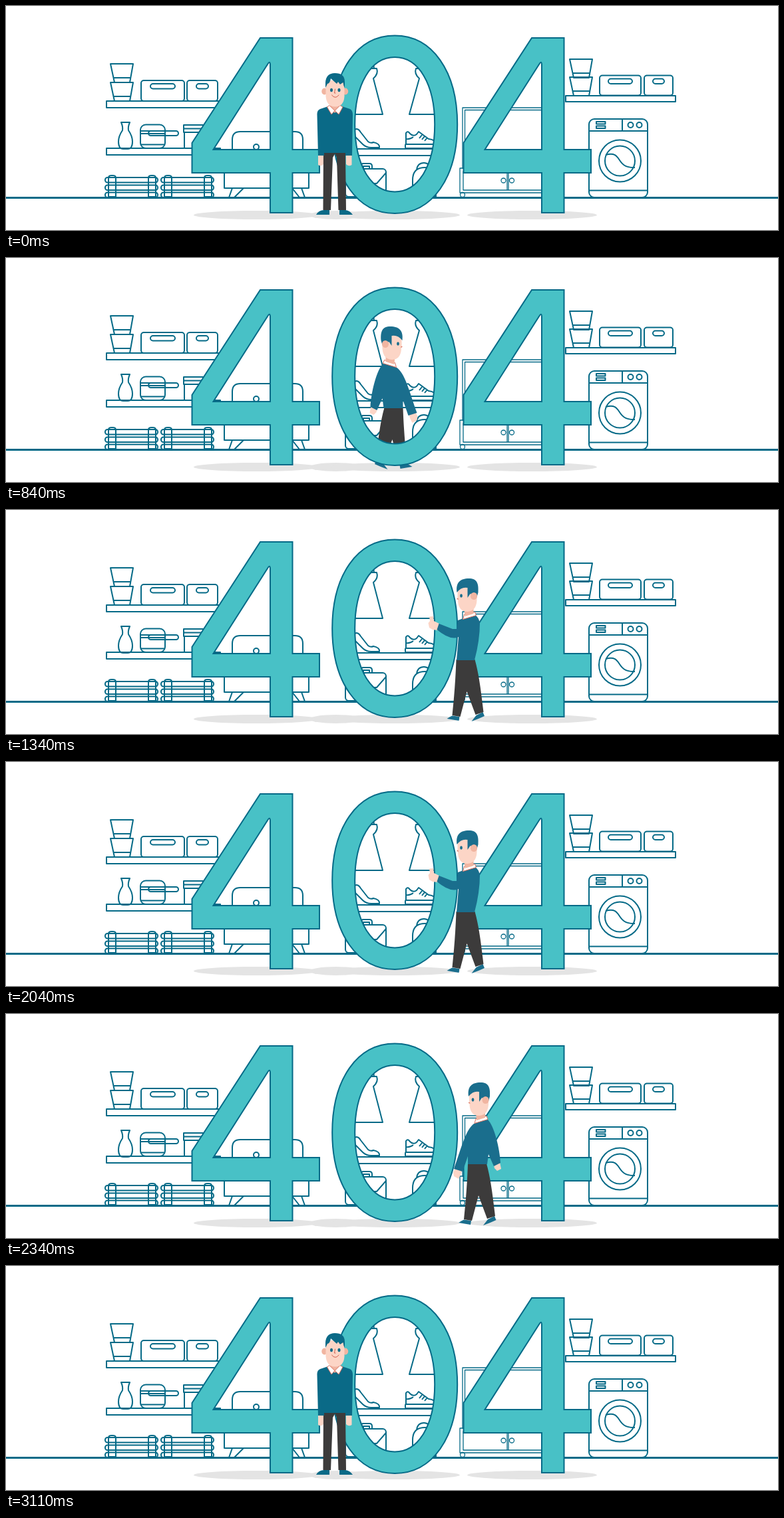
An HTML page that plays this animation: 1160x337 px, repeating every 4810 ms.

```html
<!DOCTYPE html>
<html lang="en">
<head>
<meta charset="utf-8">
<title>404</title>
<style>
  html, body { margin: 0; width: 100%; height: 100%; overflow: hidden; background: #fff; }
  svg { display: block; width: 1160px; height: 337px; }
  .line { fill: none; stroke: #056a87; stroke-width: 2; stroke-linejoin: round; }
  .line .bg { fill: #fff; }
  .thin { stroke-width: 1.3; }
  .digit { fill: #48c1c6; stroke: #056a87; stroke-width: 2; fill-rule: evenodd; }
  .shade { fill: #e4e4e4; }
  .hair, .shoe { fill: #0a6a87; }
  .front { fill: #0a6a87; }
  .knit { fill: #1a6e8d; }
  .skin { fill: #fcd5c6; }
  .blush { fill: #f1b5a1; }
  .pants { fill: #3c3b3b; }
  .collar { fill: #fff; stroke: #d9705f; stroke-width: 1; }
  .mouth { fill: none; stroke: #d0604f; stroke-width: 1; stroke-linecap: round; }
  .pose { display: none; }
</style>
</head>
<body>
<svg id="stage" viewBox="0 0 1160 337"></svg>
<script>
const path = (d, cls = '') => `<path class="${cls}" d="${d}"/>`;
const box = (x1, y1, x2, y2, r = 0, cls = '') =>
  `<rect class="${cls}" x="${x1}" y="${y1}" width="${x2 - x1}" height="${y2 - y1}" rx="${r}"/>`;
const oval = (cx, cy, rx, ry = rx, cls = '') =>
  `<ellipse class="${cls}" cx="${cx}" cy="${cy}" rx="${rx}" ry="${ry}"/>`;
const group = (inner, attrs = '') => `<g ${attrs}>${inner}</g>`;
const move = (x, inner, y = 0) => group(inner, `transform="translate(${x} ${y})"`);

// ---- Room ----
const pot = (x, y) => move(x, path('M0 0H34L29 28H6ZM5 21H30'), y);
const bin = (x, y, w, h, inset, slot) =>
  box(x, y, x + w, y + h, 4) + box(x + inset, y + 5, x + inset + slot, y + 12.5, 3.8);

const crate = x => move(x,
  [258, 269.5, 280.5].map(y => box(0, y, 79, y + 7.5, 3.5)).join('') +
  [5, 65].map(p => path(`M${p} 287V259Q${p} 255 ${p + 4} 255H${p + 7}Q${p + 11} 255 ${p + 11} 259V287Z`)).join(''));

const dress = x => move(x, path(
  'M616 94H653Q656 102 648 109L662 163H606L621 109Q613 102 616 94Z' +
  'M619.5 94L622 77H628V94M641 94V77H647L649 94'));

const leftSide =
  pot(157, 87) + pot(157, 115) +
  bin(203, 112, 65, 31, 14, 37) + bin(272, 112, 46, 31, 14, 18) +
  box(151, 143, 322, 153) + box(151, 214, 322, 224) +
  path('M173 175H186Q183 182 184 187C188 193 190 198 190 204Q190 215 183 215H176Q169 215 169 204C169 198 171 193 175 187Q176 182 173 175Z') +
  box(202, 178.5, 239, 214, 8) + path('M202 188H239M202 192H239M203 208.5H238') +
  box(214, 188, 259, 195, 3.5) +
  box(267, 179, 310, 190) + path('M267 184.5H310') + box(268, 190, 310, 214) +
  crate(149) + crate(233) +
  path('M340 216V201Q340 189 352 189H434Q446 189 446 201V216') + oval(376, 212, 4) +
  box(328, 230, 455, 274) +
  path('M340 274L335 288H343L357 274M430 274L441 288H449L444 274');

const middle =
  dress(0) + dress(-96) + box(497, 215, 665, 225) +
  path('M524 186Q529 183 533 190L544 204Q548 207 552 205Q562 207 561 213H549Q541 213 536 208L524 196') +
  path('M601 208V191Q604 187 607 192Q612 197 617 193L620 189L635 200Q645 201 647 208M612 197Q607 201 601 200M621 199L625 194M625 201L629 196M629 203L633 198') +
  box(600, 208, 648, 214, 1) +
  box(510, 245, 571, 287, 5) +
  path('M511 247L523 267H557L571 251M533 245V241Q533 237 537 237H546Q550 237 550 241V245M537 245V241H546V245') +
  box(536, 264, 545, 271) +
  path('M611 287V262Q611 243 629 243Q646 243 646 262V287ZM617 247Q618 236 628 236Q637 236 638 247M611 273H646') +
  box(624, 279, 642, 284);

const cabinet =
  box(686, 153, 820, 244) + box(689.5, 156.5, 816, 244) +
  box(682, 244, 826, 281) + box(687, 249, 822, 277) +
  path('M753 249V277M755 249V277') +
  oval(747.5, 262.5, 3.5) + oval(760, 262.5, 3.5) + oval(686, 284, 3.5);

const rightSide =
  pot(847, 80) + pot(847, 107) + box(841, 135, 1006, 144) +
  bin(892, 104.5, 62, 30, 13, 36) + bin(959, 104.5, 43, 30, 13, 17) +
  box(876, 170, 964, 288, 8, 'bg') + path('M876 188H964M926 170V188M876 277.5H964') +
  box(887, 174, 900.5, 177.5) + box(887, 180.5, 900.5, 184) +
  oval(938.5, 179, 4) + oval(951.5, 179, 4) +
  oval(922.5, 233, 31.5) + oval(922.5, 233, 22.5) +
  path('M901 224C928 217 914 244 945 243');

// ---- Digits ----
const four = x => move(x, path(
  'M382 48H430.5V216H471V251H430.5V311H397V251H279.5V206Z' +
  'M397 216V88Q396.5 82 393.5 87L311.5 216Z', 'digit'));

const ring = (a, b, k = 0.6) => {
  const p = a * k, q = b * k;
  return `M0 ${-b}C${p} ${-b} ${a} ${-q} ${a} 0S${p} ${b} 0 ${b}S${-a} ${q} ${-a} 0S${-p} ${-b} 0 ${-b}Z`;
};
const zero = path(ring(94, 133.7) + ring(60, 101.2), 'digit');

// ---- Man ----
const standing =
  path('M469 224H477V238Q473 242 469 239ZM511 224H519.5V239Q515 242 511 238Z', 'skin') +
  path('M477 219H510L511 307H499.5L497 228L494.5 222L491 228L488 307H476.5Z', 'pants') +
  path('M466 314Q470 307 478 307H486V314ZM501 314V307H510Q517 308 521 314Z', 'shoe') +
  path('M484 151H505L517 155Q521 157 521 164L520 225H510V221H478V225H469L467.5 164Q467 157 472 155Z', 'front') +
  path('M487 146H502V153L494 161L487 153Z', 'blush') +
  path('M486 149.5L494 157.5L489 163L482.5 152ZM502 149.5L494 157.5L500 163L506 152Z', 'collar') +
  oval(478.5, 128.5, 4.2, 5, 'blush') + oval(510, 128.5, 4.2, 5, 'blush') +
  path('M480.5 112V136Q482 151.5 494.5 151.5Q507.500 151.5 508.500 136V112Z', 'skin') +
  path('M480 123V115Q481 101 494 101Q509 101 509 114V123Q507 120 506.500 115L502 118L499 114L497 117L488 109Q487 116 483 117Z', 'hair') +
  oval(489, 126.5, 2, 2.8, 'hair') + oval(500.5, 126.5, 2, 2.8, 'hair') +
  path('M494.500 125L493.500 131H495M489.500 134Q495 141 500 134', 'mouth');

const head =
  path('M-5 146H9V156L-4 160Z', 'blush') +
  path('M-15 116V131L-16 134L-14.500 135.500Q-14 153 0 153Q13 152 14 136V114Z', 'skin') +
  path('M-16 124C-18 109 -11 103 2 103C14 103 17 110 16 124L14 131L4 126L0 132V117Q-9 115 -16 124Z', 'knit') +
  oval(9.5, 129.5, 5, 5.5, 'blush') + oval(-9.5, 129, 1.9, 2.7, 'knit') +
  path('M-15.500 133.500L-14 134', 'mouth');

const collar = path('M-7 164.500L-5 157.500L11 153.500L13 158.500Z', 'collar');

const swing =
  path('M-36 233L-26 236L-28 242L-31 248L-38 244L-39 238ZM22 227L31 223L33 233L27 236L23 232Z', 'skin') +
  path('M-6 164C-20 171 -27 203 -38 233L-25 237L-17 214V226H12L14 211L22 229L32 224C31 203 23 168 12 158Z', 'knit');

const stride =
  path('M-31 314Q-27 311 -23 309.500L-12 311L-13 317ZM6 318L13 309L23 304L25.500 310Q17 314 6 318Z', 'knit') +
  path('M-17 225H11C18 250 21 280 24 304L12 308L-1 273L-11 311L-23 309C-20 280 -18 255 -17 225Z', 'pants');

const passing =
  path('M-18 314Q-15 308 -8 307H3V314ZM-6 314Q-3 308 3 307H12V314Z', 'knit') +
  path('M-17 222H11L12 308H-9Z', 'pants');

const reach =
  path('M651 171L643 167L642 160L636 160.500L637 167L634.500 170L636 177L641 180L649 181Z', 'skin') +
  path('M687 163L679 166L677 179L671 179L650.500 171L647.500 180Q668 197 680 191L677 226H704Q712 196 712 170Q710 161 705 158Z', 'knit');

const heave =
  path('M677 154L671 148L673 139L666 137.500L662 143L663 149L666 156L670 160Z', 'skin') +
  path('M711 164L703 172L690 173L676 153.500L668.500 160Q674 176 684 183Q692 187 698 185Q686 208 675 227L702 228Q717 208 728 184Q732 172 729 165Z', 'knit');

const walker = stride + swing + collar + head;
const pose = (id, inner) => group(inner, `class="pose" id="${id}"`);
const facingRight = (x, inner) => group(inner, `transform="translate(${x} 0) scale(-1 1)"`);

const shadows = [[376, 94], [496, 40], [584, 98], [790.5, 97.5]]
  .map(([x, r]) => oval(x, 314.5, r, 6.5, 'shade')).join('');

document.getElementById('stage').innerHTML =
  group(path('M0 288.500H1160').replace('/>', ' stroke-width="3" style="stroke-width:3"/>') +
    leftSide + middle + group(cabinet, 'class="thin"') + rightSide, 'class="line"') +
  shadows +
  pose('inside', facingRight(579.5, walker)) +
  four(0) + four(408) + group(zero, 'id="zero"') +
  pose('stand', standing) +
  pose('step', facingRight(534.5,
    passing + group(swing + collar, 'transform="scale(.9 1)"') + move(0, head, -2))) +
  pose('push', move(693.5, stride) + reach + move(693.5, collar + head)) +
  pose('lift', move(693.5, stride) + heave +
    group(head, 'transform="translate(719 160) rotate(24) translate(0 -157)"') +
    path('M709 165.500L713 159.500L729 161L729 166.500Z', 'collar')) +
  pose('back', walker);

// ---- Timeline: start, pose, x of the walker ----
const LOOP = 4810;
const steps = [
  [0, 'stand'], [470, 'step'], [840, 'inside'], [1340, 'push'], [1640, 'lift'],
  [2040, 'push'], [2340, 'back', 711], [2740, 'back', 612], [3110, 'stand']
];
const poses = [...document.querySelectorAll('.pose')];
const zeroNode = document.getElementById('zero');
const began = performance.now();
let shown = null;

function draw() {
  const t = (performance.now() - began) % LOOP;
  const step = steps.filter(s => s[0] <= t).pop();
  if (step !== shown) {
    shown = step;
    const [, name, x = 0] = step;
    for (const p of poses) p.style.display = p.id === name ? 'inline' : 'none';
    document.getElementById('back').setAttribute('transform', `translate(${x} 0)`);
    zeroNode.setAttribute('transform', name === 'lift'
      ? 'translate(603 159) rotate(32) scale(.96)'
      : 'translate(584.2 178.3)');
  }
  requestAnimationFrame(draw);
}
draw();
</script>
</body>
</html>
```
